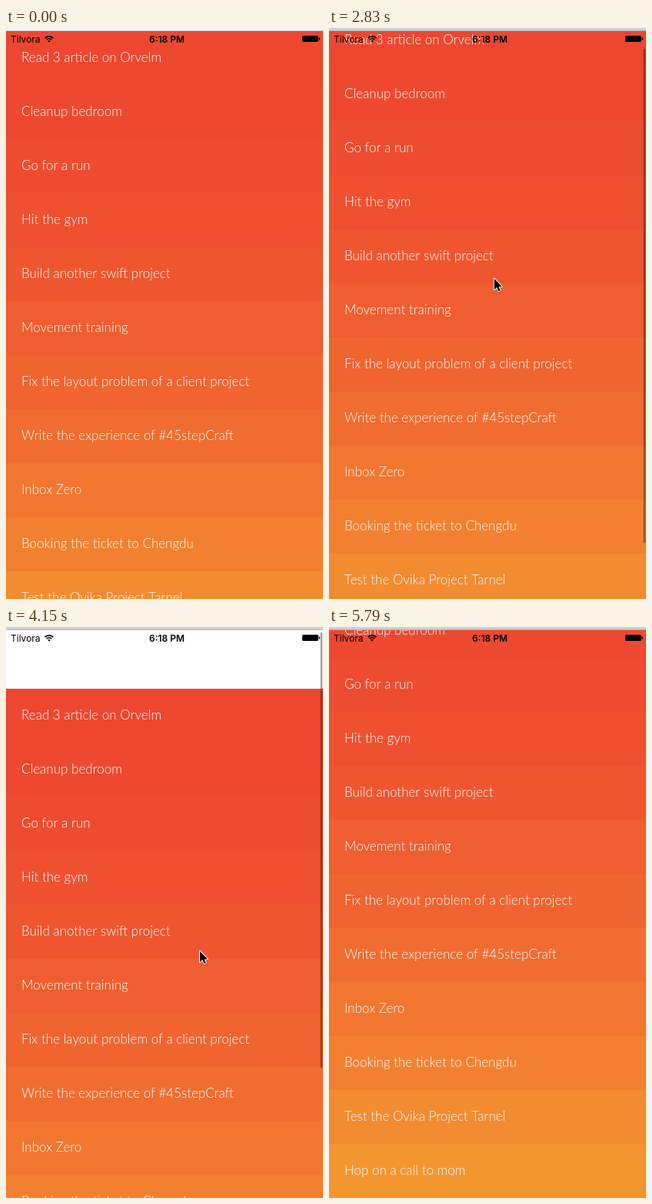
Write an HTML page with a canvas that moves like this. It is 412 px wide and 740 px high and loops after 6870 ms.

```html
<!DOCTYPE html>
<html lang="en">
<head>
<meta charset="utf-8">
<title>Task list</title>
<style>
  html, body { margin: 0; width: 100%; height: 100%; overflow: hidden; background: #fff; }
  canvas { display: block; }
</style>
</head>
<body>
<canvas id="stage" width="412" height="740"></canvas>
<script>
const ctx = document.getElementById('stage').getContext('2d');
const LOOP = 6870, TOP = 4, VIEW = 736, ROW = 70;
const tasks = [
  'Read 3 article on Orvelm', 'Cleanup bedroom', 'Go for a run', 'Hit the gym',
  'Build another swift project', 'Movement training',
  'Fix the layout problem of a client project',
  'Write the experience of #45stepCraft', 'Inbox Zero',
  'Booking the ticket to Chengdu', 'Test the Ovika Project Tarnel', 'Hop on a call to mom'
];
const MAX_SCROLL = tasks.length * ROW - VIEW;

// Pointer path: time, x, y
const path = [
  [540, 327, 406], [970, 231, 337], [1150, 231, 337], [1560, 227, 129], [1640, 227, 129],
  [1950, 222, 400], [2250, 222, 400], [2600, 210, 346], [2769, 210, 346], [3100, 251, 98],
  [3880, 251, 98], [4200, 251, 440], [4400, 251, 440], [4750, 252, 325], [4850, 252, 325],
  [5090, 252, 123]
];
// Drags: press time, release time, scroll position at press
const drags = [[1640, 2100, 0], [2769, 3100, 0], [3968, 4260, MAX_SCROLL], [4850, 5100, 0]];
const POINTER_HIDE = 5620, BAR_FADE = [5560, 5780], ACTIVATE = 1200;

const clamp = (v, lo, hi) => Math.min(hi, Math.max(lo, v));

function pointerAt(t) {
  const i = path.findIndex(p => p[0] > t);
  if (i < 0) return path[path.length - 1].slice(1);
  if (i === 0) return path[0].slice(1);
  const [t0, x0, y0] = path[i - 1], [t1, x1, y1] = path[i];
  const u = (t - t0) / (t1 - t0), e = u * u * (3 - 2 * u);
  return [x0 + (x1 - x0) * e, y0 + (y1 - y0) * e];
}

// Finger tracking with rubber-band edges, then a critically damped return
function scrollAt(t) {
  const drag = drags.filter(d => d[0] <= t).pop();
  if (!drag) return 0;
  const [press, release, base] = drag;
  const raw = base + pointerAt(press)[1] - pointerAt(Math.min(t, release))[1];
  const edge = clamp(raw, 0, MAX_SCROLL), pull = Math.abs(raw - edge);
  const stretch = Math.sign(raw - edge) * VIEW * (1 - 1 / (pull * 0.55 / VIEW + 1));
  const w = 11.5 * Math.max(0, t - release) / 1000;
  return edge + stretch * (1 + w) * Math.exp(-w);
}

function drawRows(scroll) {
  ctx.font = '300 17px Lato, "Open Sans", sans-serif';
  ctx.textAlign = 'left';
  tasks.forEach((task, i) => {
    const y = TOP + i * ROW - Math.round(scroll);
    const k = (i / (tasks.length - 1)) ** 1.65;
    ctx.fillStyle = `rgb(${238 + 6 * k}, ${71 + 79 * k}, 48)`;
    ctx.fillRect(0, y, 412, ROW);
    ctx.fillStyle = '#fff';
    ctx.fillText(task, 20, y + 40);
  });
}

function drawScrollBar(scroll, t) {
  const alpha = 1 - clamp((t - BAR_FADE[0]) / (BAR_FADE[1] - BAR_FADE[0]), 0, 1);
  if (t < drags[0][0] || !alpha) return;
  const edge = clamp(scroll, 0, MAX_SCROLL);
  const length = 640 - Math.abs(scroll - edge);
  const y = scroll > MAX_SCROLL ? 738 - length : 7 + edge / MAX_SCROLL * 91;
  ctx.fillStyle = `rgba(0, 0, 0, ${0.37 * alpha})`;
  ctx.beginPath();
  ctx.roundRect(408.7, y, 2.5, length, 1.25);
  ctx.fill();
}

function drawTitleEdge(active) {
  ctx.fillStyle = active ? '#d0d0d0' : '#f4f4f4';
  ctx.fillRect(0, 0, 412, TOP - 1);
  ctx.fillStyle = active ? '#b4b4b4' : '#d4d4d4';
  ctx.fillRect(0, TOP - 1, 412, 1);
}

function drawStatusBar() {
  ctx.fillStyle = ctx.strokeStyle = '#000';
  ctx.font = '12px Inter, sans-serif';
  ctx.fillText('Tilvora', 6, 19);
  ctx.font = '600 12px Inter, sans-serif';
  ctx.textAlign = 'center';
  ctx.fillText('6:18 PM', 209, 19);

  ctx.lineWidth = 1.7;
  for (const r of [4.6, 7.6]) {
    ctx.beginPath();
    ctx.arc(56, 18.5, r, -Math.PI * 0.75, -Math.PI * 0.25);
    ctx.stroke();
  }
  ctx.beginPath();
  ctx.moveTo(56, 18.7);
  ctx.arc(56, 18.5, 2.4, -Math.PI * 0.75, -Math.PI * 0.25);
  ctx.fill();

  ctx.beginPath();
  ctx.roundRect(385, 10, 21, 8, 1.5);
  ctx.roundRect(406.8, 12.3, 1.3, 3.4, 0.6);
  ctx.fill();
}

const arrow = new Path2D('M1 1.5V16L4.3 12.9L6.6 18L8.9 17L6.7 12H11Z');
function drawPointer(t) {
  if (t < path[0][0] || t >= POINTER_HIDE) return;
  ctx.save();
  ctx.translate(...pointerAt(t));
  ctx.lineJoin = 'round';
  ctx.lineWidth = 2;
  ctx.strokeStyle = '#fff';
  ctx.shadowColor = 'rgba(0, 0, 0, .25)';
  ctx.shadowBlur = 2;
  ctx.shadowOffsetY = 1;
  ctx.stroke(arrow);
  ctx.shadowColor = 'transparent';
  ctx.fillStyle = '#000';
  ctx.fill(arrow);
  ctx.restore();
}

function draw() {
  const t = performance.now() % LOOP, scroll = scrollAt(t);
  ctx.fillStyle = '#fff';
  ctx.fillRect(0, 0, 412, 740);
  drawRows(scroll);
  drawScrollBar(scroll, t);
  drawTitleEdge(t >= ACTIVATE);
  drawStatusBar();
  drawPointer(t);
  requestAnimationFrame(draw);
}
draw();
</script>
</body>
</html>
```
